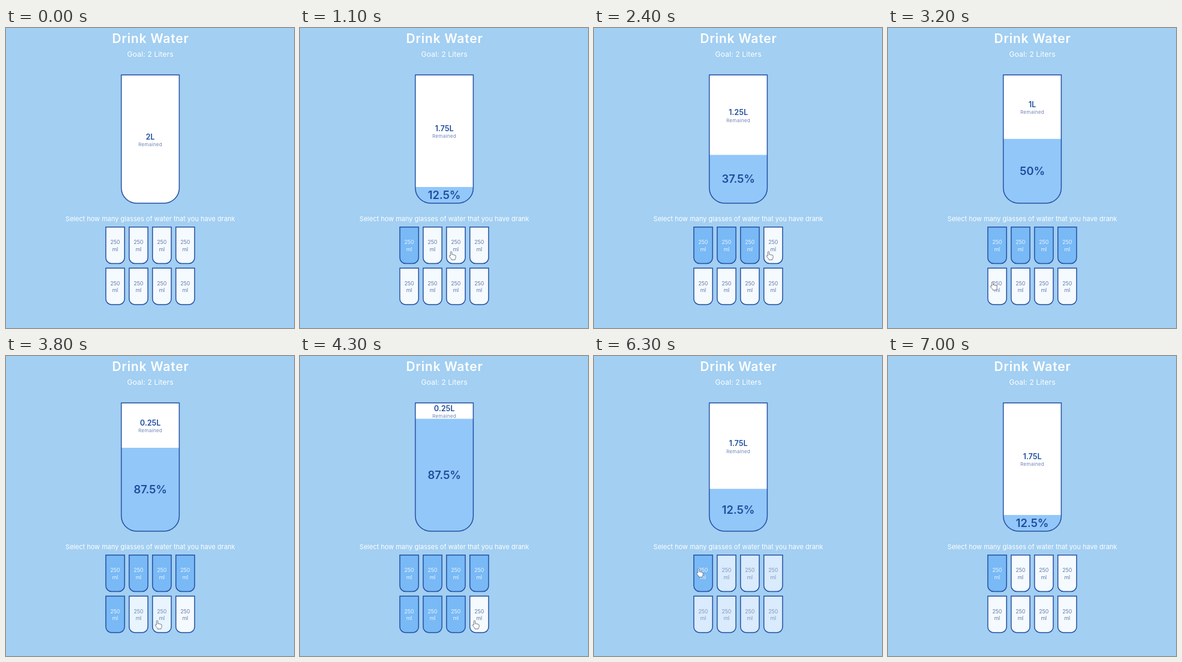
Animation, 481 px wide and 500 px high, one loop 7.5 s. Source, as an HTML page:

```html
<!DOCTYPE html>
<html lang="en">
<head>
<meta charset="utf-8">
<title>Drink Water</title>
<style>
  html, body { margin: 0; width: 100%; height: 100%; overflow: hidden; background: #a2cff2; }
  svg { display: block; width: 481px; height: 500px; }
  text { font-family: Montserrat, Inter, "Open Sans", sans-serif; text-anchor: middle; }
  .light { fill: #fff; }
  .title { font-size: 21px; font-weight: 600; letter-spacing: .8px; }
  .goal { font-size: 12.2px; letter-spacing: .1px; }
  .caption { font-size: 11px; }
  .litres { font-size: 12.6px; font-weight: 600; fill: #1f4d9e; }
  .note { font-size: 8px; letter-spacing: .35px; fill: #6c84ba; }
  .percent { font-size: 18.6px; font-weight: 600; letter-spacing: -.1px; fill: #1f4d9e; }
  .small { font-size: 8.8px; }
  .outline { fill: none; stroke: #2450a3; stroke-width: 1.5; }
  .pointer { fill: #fff; stroke: #5d6878; stroke-width: .9; stroke-linejoin: round; }
</style>
</head>
<body>
<svg viewBox="0 0 481 500">
  <defs>
    <clipPath id="inside"><path id="clipShape"/></clipPath>
  </defs>
  <text class="light title" x="241.4" y="24.8">Drink Water</text>
  <text class="light goal" x="241" y="48.2">Goal: 2 Liters</text>

  <path id="glass" fill="#fff"/>
  <g clip-path="url(#inside)">
    <rect id="water" x="192" width="98" height="240" fill="#92c7f9"/>
    <g id="remained">
      <text id="litres" class="litres" x="241" y=".3"></text>
      <text class="note" x="241" y="11.5">Remained</text>
    </g>
    <text id="percent" class="percent" x="241"></text>
  </g>
  <path id="rim" class="outline"/>

  <text class="light caption" x="241" y="322">Select how many glasses of water that you have drank</text>
  <g id="cups"></g>

  <g id="cursor" class="pointer">
    <path id="hand" d="M-1.4 7V.9Q-1.4-.3-.2-.3T1 .9V5Q2.2 4.2 3.2 5.3Q4.4 4.6 5.3 5.8Q7.4 5.4 7.4 7.4V9.6Q7.3 11.4 6.2 12.2V13.6H.3V12.4Q-1.8 10.2-3.3 7.9Q-3.8 6.7-2.8 6.3Q-2 6.2-1.4 7Z"/>
    <path id="arrow" d="M0 0V11L2.6 8.7L4.4 12.6L6.1 11.8L4.3 8H7.7Z"/>
  </g>
</svg>
<script>
const LOOP = 7500, TICK = 100, FADE = 300, TRAVEL = 350;
const TOP = 78.7, BOTTOM = 291.7, UNIT = 26.73, TOTAL = 8;

// Each visit clicks one cup, which fills all cups up to it.
const visits = [
  { cup: 1, click: 590, leave: 750 },
  { cup: 3, click: 1770, leave: 2050 },
  { cup: 4, click: 2500, leave: 2850 },
  { cup: 5, click: 3300, leave: 3400 },
  { cup: 7, click: 3770, leave: 3950 },
  { cup: 8, click: 4750, leave: 5690 },
  { cup: 1, click: 6160, leave: 6640 }
];
const away = { x: 520, y: 515 }, ENTER = 250;

const $ = id => document.getElementById(id);
const lerp = (a, b, p) => a + (b - a) * p;
const clamp = p => Math.min(1, Math.max(0, p));
const smooth = p => p * p * (3 - 2 * p);
const show = (el, on) => el.setAttribute('visibility', on ? 'visible' : 'hidden');
const bez = (s, a, b) => 3 * (1 - s) * (1 - s) * s * a + 3 * (1 - s) * s * s * b + s * s * s;

// CSS "ease", solved by bisection
function ease(p) {
  let lo = 0, hi = 1;
  for (let i = 0; i < 20; i++) {
    const mid = (lo + hi) / 2;
    if (bez(mid, .25, .25) < p) lo = mid; else hi = mid;
  }
  return bez(hi, .1, 1);
}

const tumbler = (x, y, w, h, r) =>
  `M${x} ${y}h${w}v${h - r}a${r} ${r} 0 0 1 ${-r} ${r}h${2 * r - w}a${r} ${r} 0 0 1 ${-r} ${-r}z`;

function add(parent, tag, attrs, content = '') {
  const el = document.createElementNS('http://www.w3.org/2000/svg', tag);
  for (const k in attrs) el.setAttribute(k, attrs[k]);
  el.textContent = content;
  return parent.appendChild(el);
}

for (const id of ['clipShape', 'glass', 'rim'])
  $(id).setAttribute('d', tumbler(192.6, 78.2, 96.8, 213.8, 25.5));

const cups = Array.from({ length: TOTAL }, (_, i) => {
  const col = i % 4, x = 166.7 + col * 39, y = 331.8 + (i > 3 ? 68.5 : 0);
  const d = tumbler(x, y, 31.3, 60.6, 9.5);
  add($('cups'), 'path', { d, fill: '#f5fafe' });
  const fill = add($('cups'), 'path', { d, fill: '#78b9f6' });
  add($('cups'), 'path', { d, class: 'outline' });
  const label = add($('cups'), 'g', {});
  ['250', 'ml'].forEach((word, row) =>
    add(label, 'text', { x: x + 15.6, y: y + 28.2 + row * 11.7, class: 'small' }, word));
  const aim = { x: x + 8, y: y + Math.min(41, 23 + 9 * col) };
  return { x, y, fill, label, aim };
});

function drawWater(t) {
  const i = visits.findLastIndex(v => v.click <= t);
  const now = visits[i]?.cup ?? 0, before = visits[i - 1]?.cup ?? 0;
  const raw = i < 0 ? 1 : clamp((t - visits[i].click) / FADE);
  const p = ease(raw);
  const level = Math.max(TOP, BOTTOM - lerp(before, now, p) * UNIT);

  $('water').setAttribute('y', now || raw < 1 ? level : BOTTOM + 2);
  $('litres').textContent = 2 - now / 4 + 'L';
  $('remained').setAttribute('transform', `translate(0 ${(TOP + level) / 2})`);
  show($('remained'), now < TOTAL || raw < 1);
  $('percent').textContent = now * 100 / TOTAL + '%';
  $('percent').setAttribute('y', (level + BOTTOM) / 2 + 6.7);
  show($('percent'), now);

  cups.forEach((cup, n) => {
    const full = lerp(n < before, n < now, p);
    cup.fill.setAttribute('opacity', full);
    cup.label.setAttribute('fill', `color-mix(in srgb, #ecf6ff ${full * 100}%, #647aaa)`);
  });
}

const stop = i => visits[i] ? cups[visits[i].cup - 1].aim : away;

function drawCursor(t) {
  const i = visits.findLastIndex(v => v.leave <= t);
  const from = stop(i), to = stop(i + 1);
  const p = smooth(clamp((t - (visits[i]?.leave ?? ENTER)) / TRAVEL));
  const x = lerp(from.x, to.x, p), y = lerp(from.y, to.y, p);
  const over = cups.some(c => x > c.x && x < c.x + 31 && y > c.y && y < c.y + 60);
  $('cursor').setAttribute('transform', `translate(${x} ${y})`);
  show($('hand'), over);
  show($('arrow'), !over);
}

const begin = performance.now();
function frame() {
  const t = Math.floor((performance.now() - begin) % LOOP / TICK) * TICK;
  drawWater(t);
  drawCursor(t);
  requestAnimationFrame(frame);
}
frame();
</script>
</body>
</html>
```
